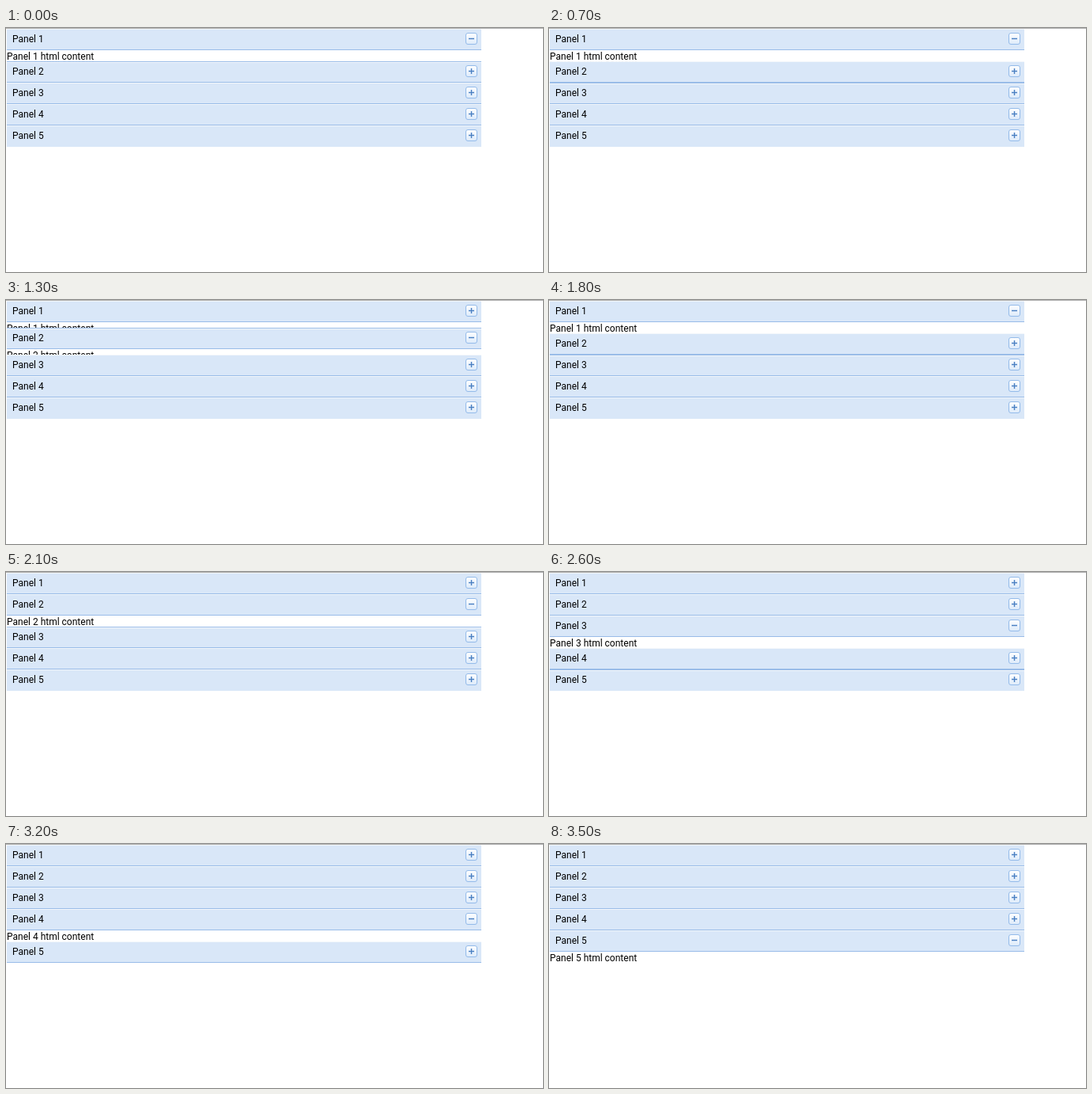
Recreate the animation shown at these times as an HTML page with a canvas. Size 679x308 px, loop 3800 ms.

```html
<!DOCTYPE html>
<html lang="en">
<head>
<meta charset="utf-8">
<title>Accordion</title>
<style>
html, body { margin: 0; width: 100%; height: 100%; overflow: hidden; background: #fff; }
canvas { display: block; }
</style>
</head>
<body>
<canvas id="stage" width="679" height="308"></canvas>
<script>
const ctx = document.getElementById('stage').getContext('2d');
const LOOP = 3800, STEP = 100;
const LEFT = 1, WIDTH = 600, HEAD = 27, BODY = 14, COUNT = 5;
const BLUE = '#99bce8', LIGHT = '#f3f7fb', FILL = '#d9e7f8';

// Height of the opening body at each step of a slide
const SLOW = [0, 10, 13, 14], QUICK = [7, 13, 14];
const slides = [
  { at: 700, from: 0, to: 1, lifts: SLOW },
  { at: 1300, from: 1, to: 0, lifts: QUICK },
  { at: 1800, from: 0, to: 1, lifts: SLOW },
  { at: 2200, from: 1, to: 2, lifts: QUICK },
  { at: 2600, from: 2, to: 3, lifts: SLOW },
  { at: 3200, from: 3, to: 4, lifts: SLOW }
];

function rect(color, x, y, w, h) {
  ctx.fillStyle = color;
  ctx.fillRect(x, y, w, h);
}

function text(str, x, y) {
  ctx.fillStyle = '#000';
  ctx.fillText(str, x, y);
}

function drawTool(x, y, open) {
  const shade = ctx.createLinearGradient(0, y, 0, y + 15);
  shade.addColorStop(0, '#fff');
  shade.addColorStop(1, '#dceafa');
  ctx.beginPath();
  ctx.roundRect(x + 0.5, y + 0.5, 14, 14, 2.5);
  ctx.fillStyle = shade;
  ctx.fill();
  ctx.strokeStyle = '#94bbea';
  ctx.stroke();
  const halo = 'rgba(90, 140, 205, 0.25)', ink = '#4a7fc0';
  rect(halo, x + 4, y + 6, 7, 3);
  if (!open) rect(halo, x + 6, y + 4, 3, 7);
  rect(ink, x + 4, y + 7, 7, 1);
  if (!open) rect(ink, x + 7, y + 4, 1, 7);
}

function drawHeader(i, y, active, shown) {
  const belowOpen = i === active + 1;
  rect(FILL, LEFT, y, WIDTH, HEAD);
  rect(belowOpen ? BLUE : LIGHT, LEFT, y, WIDTH, 1);
  if (belowOpen) rect(LIGHT, LEFT, y + 1, WIDTH, 1);
  if (i < COUNT - 1 || i === active) rect(BLUE, LEFT, y + HEAD - 1, WIDTH, 1);
  text('Panel ' + (i + 1), 8, y + 17);
  drawTool(581, y + 5, i === shown);
}

function drawBody(i, y, height) {
  ctx.save();
  ctx.beginPath();
  ctx.rect(LEFT, y, WIDTH, height);
  ctx.clip();
  text(`Panel ${i + 1} html content`, 1, y + 12);
  ctx.restore();
}

function stateAt(time) {
  const slide = slides.findLast(s => s.at <= time);
  if (!slide) return { from: -1, to: 0, lift: BODY, shown: 0 };
  const { at, from, to, lifts } = slide;
  const last = lifts.length - 1;
  const step = Math.min(last, Math.floor((time - at) / STEP));
  return { from, to, lift: lifts[step], shown: step < last ? from : to };
}

function draw(time) {
  const { from, to, lift, shown } = stateAt(time);
  rect('#fff', 0, 0, 679, 308);
  rect('#b0b0b0', 0, 0, 679, 1);
  ctx.font = '12px Roboto, sans-serif';
  let y = 1;
  for (let i = 0; i < COUNT; i++) {
    const height = i === to ? lift : i === from ? BODY - lift : 0;
    drawHeader(i, y, to, shown);
    y += HEAD;
    if (height) drawBody(i, y, height);
    y += height;
  }
}

let start;
function tick(now) {
  start ??= now;
  draw((now - start) % LOOP);
  requestAnimationFrame(tick);
}
draw(0);
requestAnimationFrame(tick);
</script>
</body>
</html>
```
